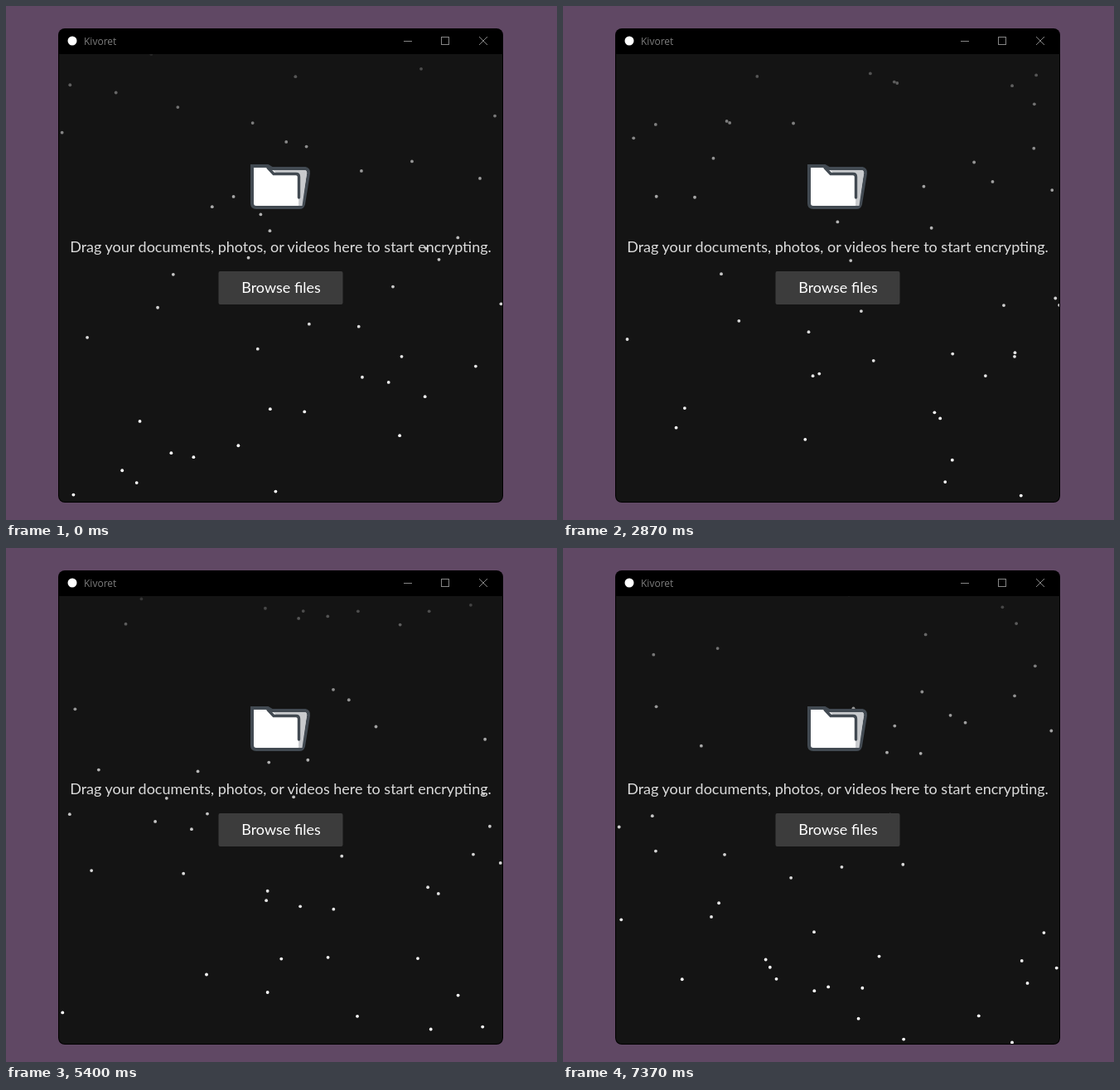
Write an HTML page with a canvas that moves like this. It is 665x620 px and loops after 7.4 s.

```html
<!DOCTYPE html>
<html lang="en">
<head>
<meta charset="utf-8">
<title>Drop files to encrypt</title>
<style>
  html, body { margin: 0; width: 100%; height: 100%; overflow: hidden; background: #604864; }
  .win { position: absolute; left: 63px; top: 27px; width: 537px; height: 572px; border-radius: 8px; background: #000; }
  canvas { position: absolute; left: 64px; top: 58px; width: 535px; height: 540px; border-radius: 0 0 7px 7px; background: #141414; }
  svg { position: absolute; left: 0; top: 0; }
  .title { font: 12px "Open Sans", "Noto Sans", sans-serif; fill: #7c7c7c; }
  .label { font: 18px Lato, "Open Sans", sans-serif; text-anchor: middle; }
</style>
</head>
<body>
<div class="win"></div>
<canvas></canvas>
<svg width="665" height="620" viewBox="0 0 665 620">
  <circle cx="80" cy="42" r="5.5" fill="#fff"/>
  <text class="title" x="94" y="47">Kivoret</text>
  <g fill="none" stroke="#858585">
    <path d="M480 42.5H490"/>
    <rect x="525.5" y="37.5" width="9" height="9"/>
    <path d="M571 37L581 47M581 37L571 47"/>
  </g>
  <path d="M297 193H316L321 196H361Q365.5 197 365 202L359 239Q358 243 354 243H302Q297 243 297 238Z" fill="#fff" stroke="#424a52" stroke-width="4"/>
  <path d="M322 198H361Q363.5 198.5 363 202L357.5 241H353L354 204Q353 201 349 201H326Z" fill="#c8cacd"/>
  <path d="M316 195L323 202.5H350Q353.5 202.5 353.5 206V231" fill="none" stroke="#424a52" stroke-width="3.4" stroke-linecap="round"/>
  <text class="label" x="331.5" y="297" fill="#dcdcdc">Drag your documents, photos, or videos here to start encrypting.</text>
  <rect x="256.5" y="320" width="150" height="40" rx="2" fill="#3c3c3c"/>
  <text class="label" x="332" y="346" fill="#fff">Browse files</text>
</svg>
<script>
const LOOP = 7400, STEP = 35.95;
const W = 535, H = 540, R = 1.9, COUNT = 48;
const SPAN_X = W + 2 * R, SPAN_Y = H + 2 * R;

const mod = (a, n) => ((a % n) + n) % n;
const rand = (i, k) => mod(Math.sin(i * 12.9898 + k * 78.233) * 43758.5453, 1);
const between = (lo, hi, r) => lo + (hi - lo) * r;

// Each snowflake drifts in a straight line; speeds are px per second.
const flakes = Array.from({ length: COUNT }, (_, i) => ({
  y: SPAN_Y * (i + rand(i, 1)) / COUNT,
  vx: between(-23, 23, rand(i, 2)),
  vy: between(47, 94, rand(i, 3))
}));

const canvas = document.querySelector("canvas");
const ctx = canvas.getContext("2d");
const dpr = window.devicePixelRatio || 1;
canvas.width = W * dpr;
canvas.height = H * dpr;
ctx.scale(dpr, dpr);
ctx.fillStyle = "#fff";

function draw(ms) {
  const t = Math.floor((ms + 8) / STEP) * STEP / 1000;
  ctx.clearRect(0, 0, W, H);
  flakes.forEach(({ y: y0, vx, vy }, i) => {
    const fall = y0 + vy * t;
    const pass = Math.floor(fall / SPAN_Y);
    const depth = mod(fall, SPAN_Y);
    // Each new pass from the top begins at a fresh x.
    const x = mod(SPAN_X * rand(i, 4 + pass) + vx * depth / vy, SPAN_X) - R;
    const y = depth - R;
    ctx.globalAlpha = Math.min(1, 0.06 + Math.sqrt(Math.max(0, y) / H));
    ctx.beginPath();
    ctx.arc(x, y, R, 0, 2 * Math.PI);
    ctx.fill();
  });
}

const start = performance.now();
function tick() {
  draw((performance.now() - start) % LOOP);
  requestAnimationFrame(tick);
}
tick();
</script>
</body>
</html>
```
